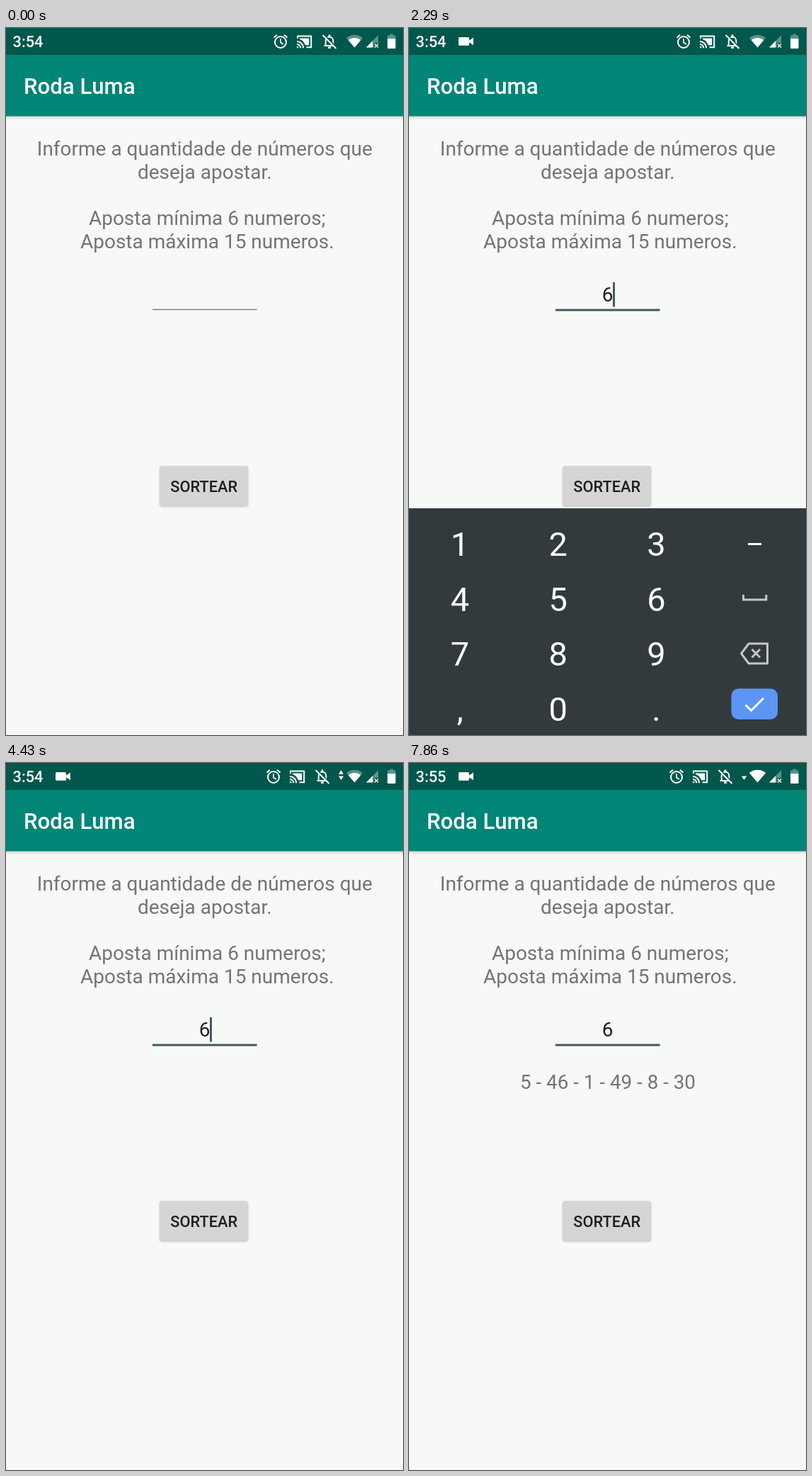
These frames come from a looping animation (561 px wide and 998 px high, 8000 ms). An HTML page with a canvas:

```html
<!DOCTYPE html>
<html lang="pt">
<head>
<meta charset="utf-8">
<title>Sorteio</title>
<style>
html, body { margin: 0; width: 100%; height: 100%; overflow: hidden; background: #f7f9f7; }
canvas { display: block; width: 561px; height: 998px; }
</style>
</head>
<body>
<canvas id="stage" width="561" height="998"></canvas>
<script>
const ctx = document.getElementById('stage').getContext('2d');
const LOOP = 8000, FPS = 7;
const PAPER = '#f7f9f7', GREY = '#737573', ACCENT = '#435a61', WHITE = '#fff';
const clamp = v => Math.max(0, Math.min(1, v));
const mix = (a, b, p) => Math.round(a + (b - a) * p);

function rect(x, y, w, h, color) {
  ctx.fillStyle = color;
  ctx.fillRect(x, y, w, h);
}

function round(x, y, w, h, r, color) {
  ctx.fillStyle = color;
  ctx.beginPath();
  ctx.roundRect(x, y, w, h, r);
  ctx.fill();
}

function text(str, x, y, size, color, weight = 400, align = 'center') {
  ctx.font = `${weight} ${size}px Roboto, sans-serif`;
  ctx.textAlign = align;
  ctx.fillStyle = color;
  ctx.fillText(str, x, y);
}

function trace(pts, close) {
  ctx.beginPath();
  pts.forEach(([x, y]) => ctx.lineTo(x, y));
  if (close) ctx.closePath();
}

function line(pts, color, width, close) {
  trace(pts, close);
  ctx.strokeStyle = color;
  ctx.lineWidth = width;
  ctx.stroke();
}

function poly(pts, color) {
  trace(pts, true);
  ctx.fillStyle = color;
  ctx.fill();
}

function arc(x, y, r, from, to) {
  ctx.beginPath();
  ctx.arc(x, y, r, from, to);
  ctx.stroke();
}

function at(x, y, draw) {
  ctx.save();
  ctx.translate(x, y);
  draw();
  ctx.restore();
}

function withShadow(color, blur, dy, draw) {
  ctx.save();
  ctx.shadowColor = color;
  ctx.shadowBlur = blur;
  ctx.shadowOffsetY = dy;
  draw();
  ctx.restore();
}

// Status icons, drawn around their own centre
function camera() {
  round(-11, -6, 15, 11.7, 1.5, WHITE);
  poly([[4, -1.5], [10, -5.5], [10, 5.2], [4, 1.2]], WHITE);
}

function alarm() {
  ctx.strokeStyle = WHITE;
  ctx.lineWidth = 2;
  arc(0, 1, 8, 0, 7);
  line([[0, -4], [0, 1.5], [4, 4]], WHITE, 1.7);
  line([[-9.5, -5.5], [-5, -9.3]], WHITE, 2);
  line([[9.5, -5.5], [5, -9.3]], WHITE, 2);
}

function cast() {
  line([[-9.5, -4.5], [-9.5, -8], [9.7, -8], [9.7, 7.7], [3, 7.7]], WHITE, 2);
  ctx.fillStyle = WHITE;
  ctx.beginPath();
  ctx.moveTo(-6.5, -5);
  ctx.lineTo(6.7, -5);
  ctx.lineTo(6.7, 4.7);
  ctx.lineTo(1.5, 4.7);
  ctx.quadraticCurveTo(-1, -2, -6.5, -3.5);
  ctx.fill();
  ctx.lineWidth = 2;
  for (const r of [1.5, 5.3, 9.2]) arc(-10.5, 8.7, r, -Math.PI / 2, 0);
}

function bellOff() {
  ctx.strokeStyle = WHITE;
  ctx.lineWidth = 1.9;
  ctx.beginPath();
  ctx.moveTo(-7.5, 6);
  ctx.lineTo(7.5, 6);
  ctx.moveTo(-5.3, 6);
  ctx.lineTo(-5.3, -1);
  ctx.bezierCurveTo(-5.3, -8.3, 5.3, -8.3, 5.3, -1);
  ctx.lineTo(5.3, 6);
  ctx.stroke();
  rect(-1.4, -9.5, 2.8, 4, WHITE);
  rect(-2, 7.5, 4, 2.3, WHITE);
  line([[-8, -9.5], [10.5, 9]], '#00574b', 2);
  line([[-9.5, -9], [9.5, 10]], WHITE, 2);
}

function fan(r, color) {
  ctx.fillStyle = color;
  ctx.beginPath();
  ctx.moveTo(492.5, 27.5);
  ctx.arc(492.5, 27.5, r, -Math.PI / 2 - 0.71, -Math.PI / 2 + 0.71);
  ctx.fill();
}

function statusBar(n) {
  const dim = 'rgba(255,255,255,0.35)';
  rect(0, 0, 561, 38, '#00574b');
  text(n < 45 ? '3:54' : '3:55', 9.5, 27, 21.8, WHITE, 500, 'left');
  ctx.globalAlpha = clamp(n / 3);
  at(81, 19, camera);
  ctx.globalAlpha = 1;

  const active = n >= 25, shift = active ? -10 : 0;
  at(388 + shift, 19, alarm);
  at(421.5 + shift, 19.5, cast);
  at(457 + shift, 19, bellOff);
  if (active) {
    if (n < 33) poly([[470, 15.8], [473.5, 10.3], [477, 15.8]], WHITE);
    poly([[470, 18.5], [477, 18.5], [473.5, 24]], WHITE);
  }

  fan(17.7, dim);
  fan(n >= 50 ? 17.7 : 13.5, WHITE);
  poly([[526, 10], [526, 21], [520, 21], [520, 27.5], [509, 27.5]], dim);
  poly([[518, 18.3], [518, 27.5], [509, 27.5]], WHITE);
  line([[521, 22.5], [526, 27.5]], WHITE, 1.5);
  line([[526, 22.5], [521, 27.5]], WHITE, 1.5);
  rect(542.3, 8.5, 5, 2, dim);
  rect(539, 10.5, 11.5, 4.5, dim);
  round(539, 15, 11.5, 14, [0, 0, 1, 1], WHITE);
}

function header(n) {
  withShadow('rgba(0,0,0,0.2)', 5, 1, () => rect(-10, 38, 581, 86.5, '#008577'));
  statusBar(n);
  text('Roda Luma', 25, 93, 31.2, WHITE, 500, 'left');
}

function prompt() {
  const put = (row, x, i) => text(row, x, 180 + i * 32.8, 28, GREY);
  put('Informe a quantidade de números que', 280.8, 0);
  put('deseja apostar.', 280.8, 1);
  put('Aposta mínima 6 numeros;', 284.3, 3);
  put('Aposta máxima 15 numeros.', 284.3, 4);
}

function field(n) {
  const focus = n >= 9, typed = n >= 15;
  if (focus) rect(207, 396.6, 147.5, 3, ACCENT);
  else rect(207, 396.7, 147.5, 1.5, '#808280');
  if (typed) text('6', 280.5, 386, 28, '#1e201f');
  const on = typed ? n === 15 || (n - 16) % 7 < 3 : focus && n < 13;
  if (on) rect(typed ? 288 : 280, 359, 3, 34.5, ACCENT);
}

function result(n) {
  if (n < 36) return;
  text(n < 51 ? '52 - 33 - 28 - 39 - 58 - 49' : '5 - 46 - 1 - 49 - 8 - 30', 281, 459.5, 27.8, GREY);
}

function button(n) {
  let press = 0;
  for (const start of [35, 43, 50]) if (n >= start) press = clamp(1 - (n - start) / 3);
  const c = [[213, 184], [214, 186], [211, 184]].map(([a, b]) => mix(a, b, press));
  withShadow(`rgba(0,0,0,${0.25 + press * 0.15})`, 3 + press * 9, 1.2 + press * 3.3,
    () => round(217.3, 618.3, 124.5, 56, 3, `rgb(${c})`));
  text('SORTEAR', 279.7, 654.7, 21.8, '#1c1e1d', 500);
}

function keyboard(n) {
  const ms = n * 1000 / FPS;
  const u = clamp((ms - 1250) / 255);
  const alpha = Math.min(1 - (1 - u) ** 2, clamp(1 - (ms - 4150) / 250));
  if (alpha <= 0) return;
  ctx.save();
  ctx.globalAlpha = alpha;
  ctx.translate(0, 44 * (1 - alpha));
  rect(0, 678, 561, 320, '#323a3d');
  ['123', '456', '789', ',0.'].forEach((row, r) => {
    [...row].forEach((key, c) => text(key, 72 + c * 138.7, 745 + r * 77.6, 47, WHITE));
  });
  rect(479, 727, 19, 3, WHITE);
  const soft = '#c3c6c7';
  line([[472.5, 800], [472.5, 807], [504.8, 807], [504.8, 800]], soft, 3);
  ctx.lineJoin = 'round';
  line([[480, 869], [506.5, 869], [506.5, 897], [480, 897], [469.5, 883]], soft, 3, true);
  line([[484.5, 877], [496, 888.5]], soft, 3);
  line([[496, 877], [484.5, 888.5]], soft, 3);
  ctx.lineJoin = 'miter';
  round(455.5, 932.5, 65.5, 43.5, 10, n < 19 ? '#5c95f3' : '#4285f4');
  line([[475.5, 955.5], [483.5, 963.5], [501, 946]], WHITE, 3);
  ctx.restore();
}

function draw(ms) {
  const n = Math.floor((ms % LOOP + 6) * FPS / 1000) % (LOOP * FPS / 1000);
  rect(0, 0, 561, 998, PAPER);
  header(n);
  prompt();
  field(n);
  result(n);
  button(n);
  keyboard(n);
}

const begin = performance.now();
function tick() {
  draw(performance.now() - begin);
  requestAnimationFrame(tick);
}
tick();
</script>
</body>
</html>
```
